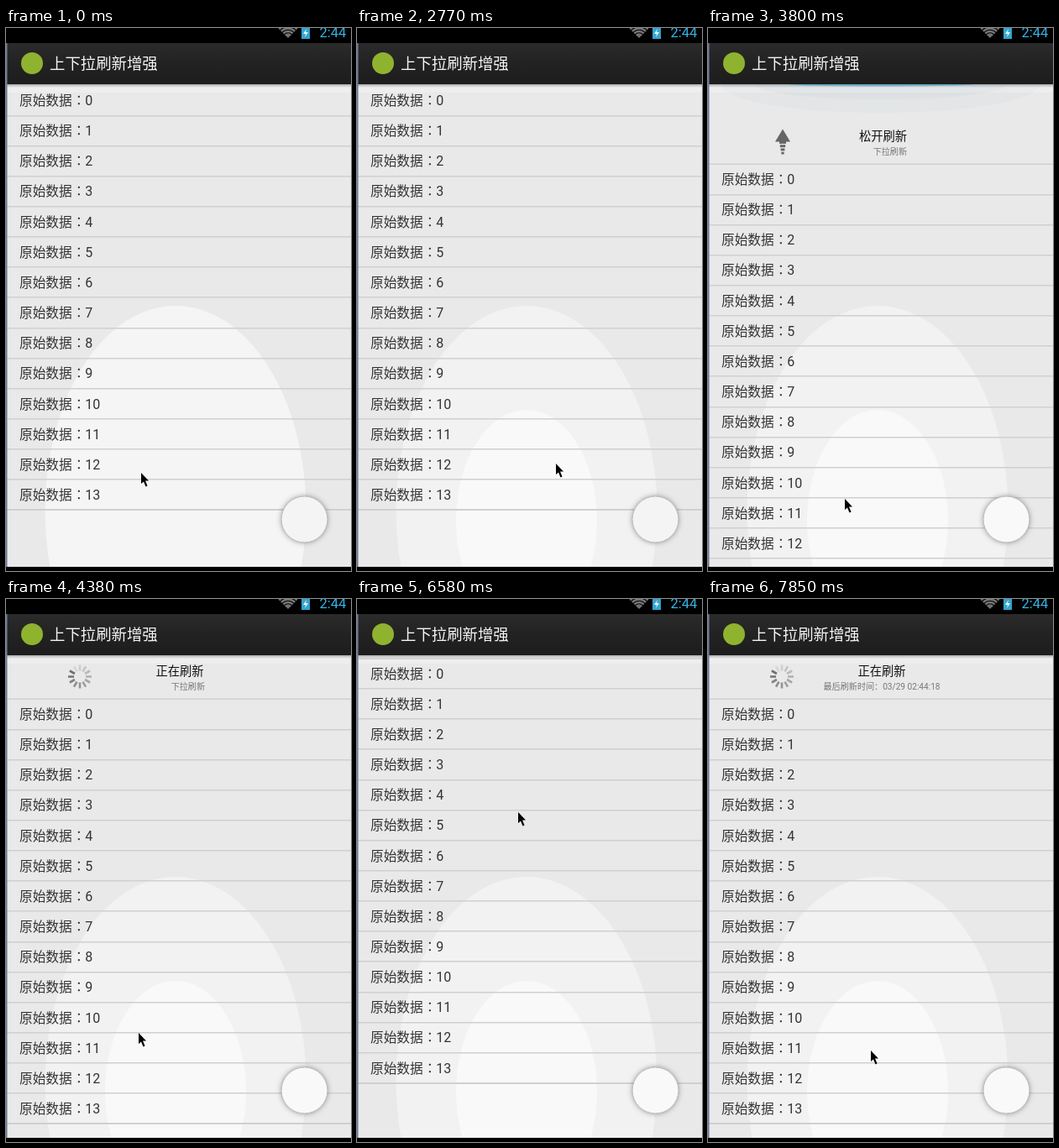
An HTML page with a canvas that plays this animation: 411 px wide and 647 px high, repeating every 8000 ms.

```html
<!DOCTYPE html>
<html lang="zh-CN">
<head>
<meta charset="utf-8">
<title>下拉刷新</title>
<style>
  html, body { margin: 0; width: 100%; height: 100%; overflow: hidden; background: #000; }
  canvas { display: block; }
</style>
</head>
<body>
<canvas id="stage" width="411" height="647"></canvas>
<script>
const ctx = document.getElementById('stage').getContext('2d');
const LOOP = 8000, TOP = 67, BOTTOM = 642, ROW = 36.15, HEADER = 51;
const FONT = 'Roboto, "Noto Sans CJK SC", sans-serif';

const bursts = [
  [120, 1070, 8], [1210, 2140, 8], [2260, 3230, 8], [3350, 4380, 8],
  [4530, 5510, 8], [5890, 6850, 8], [7000, 7850, 7]
];

// [time, x, y]
const pointerKeys = [
  [0, 161, 530], [120, 161, 533], [600, 157, 569], [1070, 161, 565],
  [2140, 340, 630], [2260, 363, 632], [2770, 209, 493], [3230, 147, 236],
  [3350, 152, 345], [3500, 162, 471], [3700, 163, 560], [3850, 163, 562],
  [4380, 158, 517], [5510, 161, 490], [5890, 161, 490], [6300, 180, 250],
  [6500, 190, 225], [6850, 201, 360], [7000, 202, 512], [7200, 202, 545],
  [7850, 194, 538]
];

// [time, distance the list is pulled down]
const pullKeys = [
  [0, 0], [3280, 0], [3350, 22], [3500, 64], [3700, 94], [3850, 94], [4150, 51],
  [5900, 51], [6200, 0], [6560, 0], [6850, 48], [7000, 106.5], [7200, 118],
  [7300, 118], [7550, 51]
];

const clamp = v => Math.max(0, Math.min(1, v));

function snap(t) {
  let held = 0;
  for (const [first, last, count] of bursts) {
    if (t < first) break;
    const step = (last - first) / (count - 1);
    held = first + Math.min(count - 1, Math.floor((t - first) / step + 1e-6)) * step;
  }
  return held;
}

function sample(keys, t) {
  const next = keys.findIndex(k => k[0] > t);
  if (next < 0) return keys[keys.length - 1].slice(1);
  const a = keys[next - 1], b = keys[next];
  const p = (t - a[0]) / (b[0] - a[0]);
  return a.slice(1).map((v, i) => v + (b[i + 1] - v) * p);
}

function text(str, x, y, size, color, align = 'left', font = FONT) {
  ctx.font = `${size}px ${font}`;
  ctx.fillStyle = color;
  ctx.textAlign = align;
  ctx.fillText(str, x, y);
}

function rect(x, y, w, h, color) {
  ctx.fillStyle = color;
  ctx.fillRect(x, y, w, h);
}

function ellipse(x, y, rx, ry, color) {
  ctx.fillStyle = color;
  ctx.beginPath();
  ctx.ellipse(x, y, rx, ry, 0, 0, Math.PI * 2);
  ctx.fill();
}

function polygon(points, color) {
  ctx.fillStyle = color;
  ctx.beginPath();
  points.forEach(([x, y]) => ctx.lineTo(x, y));
  ctx.fill();
}

function gradient(y0, y1, ...colors) {
  const g = ctx.createLinearGradient(0, y0, 0, y1);
  colors.forEach((c, i) => g.addColorStop(i / (colors.length - 1), c));
  return g;
}

function drawBackground(t) {
  const lit = t >= 1300;
  rect(0, TOP, 411, BOTTOM - TOP, '#e9e9e9');
  rect(0, TOP, 411, 10, '#eeeeee');
  ellipse(202, 575, 155.5, 244, lit ? '#f2f2f2' : '#f5f5f5');
  if (lit) ellipse(202, 587, 84, 132, '#f9f9f9');
}

function drawArrow(x, y, degrees) {
  ctx.save();
  ctx.translate(x, y);
  ctx.rotate((90 - degrees) * Math.PI / 180);
  for (let i = 0; i < 4; i++) {
    const half = 1.6 + i * 0.8;
    rect(-15 + i * 4.2, -half, 2.9, half * 2, '#666');
  }
  polygon([[0, -4.5], [0, -9], [15, 0], [0, 9], [0, 4.5]], '#666');
  ctx.restore();
}

function drawSpinner(x, y, turns) {
  const head = Math.floor(turns * 12);
  ctx.lineWidth = 2.6;
  for (let i = 0; i < 12; i++) {
    const a = (head - i) * Math.PI / 6;
    ctx.strokeStyle = `rgba(90,90,90,${0.85 - i * 0.066})`;
    ctx.beginPath();
    ctx.moveTo(x + Math.cos(a) * 7, y + Math.sin(a) * 7);
    ctx.lineTo(x + Math.cos(a) * 14, y + Math.sin(a) * 14);
    ctx.stroke();
  }
}

function drawHeader(t, pull) {
  const firstRefresh = t >= 4000 && t < 5450;
  const secondRefresh = t >= 7400;
  const failed = t >= 5450 && t < 6300;
  const titleY = pull + 39.5, iconY = pull + 41.5;

  if (failed) {
    ctx.strokeStyle = '#f66';
    ctx.lineWidth = 1;
    ctx.beginPath();
    ctx.arc(169, pull + 34, 2.6, 0, Math.PI * 2);
    ctx.moveTo(167, pull + 34);
    ctx.lineTo(171, pull + 34);
    ctx.stroke();
    text('刷新失败！', 177, titleY, 14.3, '#f00');
  } else if (firstRefresh || secondRefresh) {
    drawSpinner(88, iconY, 7 / 12 + 4 + (t - (secondRefresh ? 7850 : 4380)) / 1000 + 0.001);
    text('正在刷新', 207, titleY, 14.3, '#111', 'center');
  } else {
    const crossed = t < 5000 ? 3438 : 6868;
    const angle = 180 * clamp((t - crossed) / 250);
    drawArrow(89, iconY, angle);
    text(pull > HEADER ? '松开刷新' : '下拉刷新', 208.5, titleY, 14.3, '#111', 'center');
  }

  if (t < 5450) text('下拉刷新', 237, pull + 57, 10.1, '#777', 'right');
  else text('最后刷新时间：03/29 02:44:18', 207, pull + 57, 10.1, '#777', 'center');
}

function drawList(t, pull) {
  ctx.save();
  ctx.beginPath();
  ctx.rect(0, TOP, 411, BOTTOM - TOP);
  ctx.clip();
  if (pull > 0) {
    drawHeader(t, pull);
    rect(0, Math.round(TOP + pull) + 0.5, 411, 1.5, '#d0d0d0');
  }
  for (let i = 0; i < 14; i++) {
    const y = pull + i * ROW;
    text('原始数据', 16, y + 92, 15.7, '#333');
    text('：', 79, y + 92, 15.7, '#333', 'left', '"Noto Sans CJK TC", sans-serif');
    text(i, 94.3, y + 92, 16, '#333');
    rect(0, Math.round(y + 103.5), 411, i === 13 ? 2 : 1.5, '#d0d0d0');
  }
  ctx.restore();
}

function drawOverscroll(pull) {
  const strength = clamp((pull - HEADER) / 56);
  rect(0, TOP, 411, 4, gradient(TOP, TOP + 4, 'rgba(0,0,0,.28)', 'rgba(0,0,0,0)'));
  if (!strength) return;
  ctx.save();
  ctx.beginPath();
  ctx.rect(0, TOP, 411, 60);
  ctx.clip();
  ctx.globalAlpha = strength;
  ellipse(206, TOP, 190, 34, 'rgba(70,130,145,.05)');
  ellipse(206, TOP, 150, 18, 'rgba(70,130,145,.05)');
  ellipse(206, TOP, 110, 2.5, 'rgba(51,160,205,.7)');
  ctx.restore();
}

function drawBars() {
  rect(0, 0, 411, 18, '#000');
  rect(0, BOTTOM, 411, 5, '#000');
  rect(0, 18, 411, 49, gradient(18, 67, '#2b2b2b', '#222', '#1d1d1d'));
  ellipse(31, 42, 13, 13, '#8fb32f');
  text('上下拉刷新增强', 52, 49, 18.4, '#f5f5f5');

  // Wi-Fi fan
  ctx.strokeStyle = '#777';
  ctx.lineWidth = 2.4;
  for (const r of [4.5, 8, 11.5, 15]) {
    ctx.beginPath();
    ctx.arc(336, 12, r, -Math.PI * 0.75, -Math.PI * 0.25);
    ctx.stroke();
  }
  polygon([[336, 12], [333.5, 9], [338.5, 9]], '#777');

  // Charging battery
  rect(352, 0, 10, 13, '#33a5d0');
  polygon([[358, 1], [354, 7], [357, 7], [356, 11], [360, 5], [357, 5]], '#e8f6fc');
  text('2:44', 373.5, 11, 16.5, '#33b5e5');

  rect(0, 18, 1.5, BOTTOM - 18, '#6d7c9b');
}

function drawButton(t) {
  ctx.save();
  ctx.shadowColor = 'rgba(0,0,0,.4)';
  ctx.shadowBlur = 6;
  ellipse(355.5, 585.5, 27.5, 27.5, t < 3350 ? '#f4f4f4' : '#f9f9f9');
  ctx.restore();
  ctx.strokeStyle = '#bdbdbd';
  ctx.lineWidth = 1;
  ctx.beginPath();
  ctx.arc(355.5, 585.5, 27.5, 0, Math.PI * 2);
  ctx.stroke();
}

function drawPointer([x, y]) {
  ctx.save();
  ctx.translate(Math.round(x), Math.round(y));
  polygon([[0, 0], [0, 13], [3, 10.5], [5.5, 16.5], [7.5, 15.5], [5, 9.5], [9, 9.5]], '#000');
  ctx.restore();
}

function render(time) {
  const t = snap(time % LOOP);
  const [pull] = sample(pullKeys, t);
  drawBackground(t);
  drawList(t, pull);
  drawOverscroll(pull);
  drawBars();
  drawButton(t);
  drawPointer(sample(pointerKeys, t));
}

const start = performance.now();
function tick() {
  render(performance.now() - start);
  requestAnimationFrame(tick);
}
tick();
</script>
</body>
</html>
```
